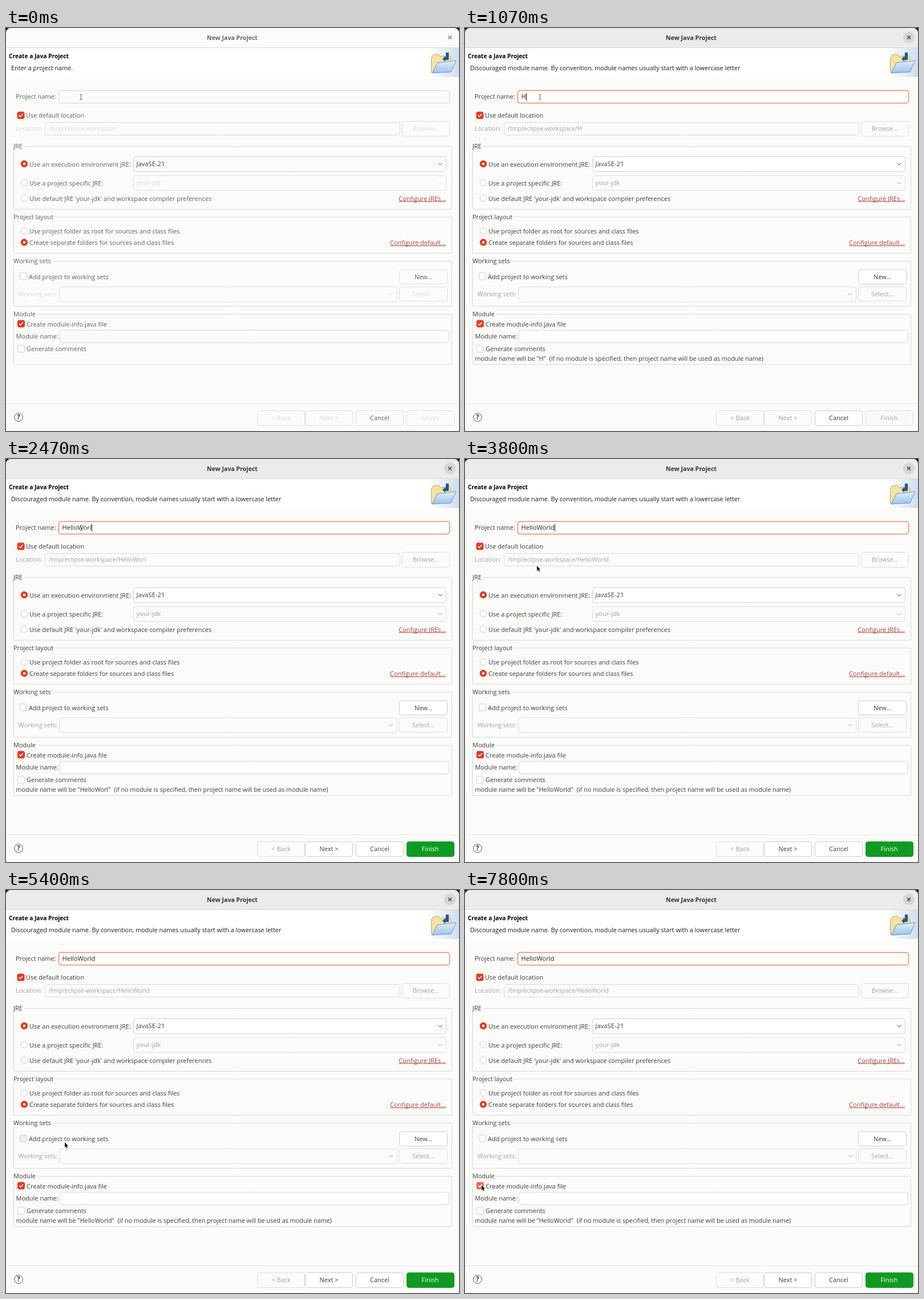
Recreate the animation shown at these times as an HTML page with a canvas. Size 794 px wide and 706 px high, loop 8 s.

```html
<!DOCTYPE html>
<html lang="en">
<head>
<meta charset="utf-8">
<title>New Java Project</title>
<style>
html, body { margin: 0; width: 100%; height: 100%; overflow: hidden; background: #fbfbfa; }
canvas { display: block; }
</style>
</head>
<body>
<canvas id="stage" width="794" height="706"></canvas>
<script>
const ctx = document.getElementById('stage').getContext('2d');
const LOOP = 8000, STEP = 200 / 3;
const FONT = '"Open Sans", "Noto Sans", sans-serif';
const LABEL = 11, FIELD = 11.2, SENTENCE = 10.8, TITLE = 10.6;
const RED = '#e03c24', PAGE = '#fbfbfa', WHITE = '#ffffff', GREEN = '#0f9a22';
const PROJECT = 'HelloWorld';
const KEY_TIMES = [1060, 1260, 1395, 1595, 1725, 1925, 2125, 2260, 2395, 2525];
// time, x, y of the pointer tip
const PATH = [
  [3390, 131, 121], [3600, 128, 152], [3800, 126, 187], [4000, 180, 375],
  [4200, 160, 550], [4600, 125, 520], [5070, 108, 455], [5400, 103, 442],
  [5930, 95, 494], [6130, 92, 509], [6330, 91, 511], [7130, 66, 524], [7530, 29, 517]
];

const clamp = v => Math.max(0, Math.min(1, v));
const easeOut = k => 1 - (1 - k) ** 3;
const fade = (t, from, length = 200) => easeOut(clamp((t - from) / length));

function mix(a, b, k) {
  const part = (c, i) => parseInt(c.slice(i, i + 2), 16);
  const rgb = [1, 3, 5].map(i => Math.round(part(a, i) + (part(b, i) - part(a, i)) * k));
  return `rgb(${rgb})`;
}

function pointerAt(t) {
  let i = 1;
  while (i < PATH.length - 1 && t > PATH[i][0]) i++;
  const [t0, x0, y0] = PATH[i - 1], [t1, x1, y1] = PATH[i];
  const k = clamp((t - t0) / (t1 - t0));
  return { x: x0 + (x1 - x0) * k, y: y0 + (y1 - y0) * k };
}

function text(str, x, cy, color, { size = LABEL, weight = 400, align = 'left' } = {}) {
  ctx.font = `${weight} ${size}px ${FONT}`;
  ctx.textAlign = align;
  ctx.fillStyle = color;
  ctx.fillText(str, x, cy + 4);
  return ctx.measureText(str).width;
}

function box(x, y, w, h, r, fill, stroke, line = 1) {
  ctx.beginPath();
  ctx.roundRect(x + 0.5, y + 0.5, w, h, r);
  ctx.fillStyle = fill;
  ctx.fill();
  if (!stroke) return;
  ctx.lineWidth = line;
  ctx.strokeStyle = stroke;
  ctx.stroke();
}

function poly(points, color, width) {
  ctx.beginPath();
  points.forEach(([x, y]) => ctx.lineTo(x, y));
  if (width) {
    ctx.lineWidth = width;
    ctx.strokeStyle = color;
    ctx.stroke();
  } else {
    ctx.fillStyle = color;
    ctx.fill();
  }
}

function disc(x, y, r, fill, stroke) {
  ctx.beginPath();
  ctx.arc(x, y, r, 0, Math.PI * 2);
  ctx.fillStyle = fill;
  ctx.fill();
  if (!stroke) return;
  ctx.lineWidth = 1;
  ctx.strokeStyle = stroke;
  ctx.stroke();
}

function checkbox(cx, cy, on, hover) {
  const fill = on ? (hover ? '#ee6a58' : RED) : (hover ? '#eeeeee' : WHITE);
  box(cx - 6.5, cy - 6.5, 12, 12, 2.5, fill, on ? fill : '#cccccc');
  if (on) poly([[cx - 3.2, cy], [cx - 0.9, cy + 2.4], [cx + 3.4, cy - 2.4]], WHITE, 1.5);
}

function radio(cy, on) {
  disc(32, cy, 5.8, on ? RED : WHITE, on ? RED : '#cccccc');
  if (on) disc(32, cy, 2.2, WHITE);
}

function group(label, top, bottom, ui) {
  box(13, top, 768, bottom - top, 1, PAGE, '#d8d8d8');
  ctx.font = `${LABEL}px ${FONT}`;
  ctx.fillStyle = PAGE;
  ctx.fillRect(12, top - 5, ctx.measureText(label).width + 3, 11);
  text(label, 13, top, ui.ink);
}

function button(label, x, y, w, h, on, ui) {
  const lit = on * ui.active;
  box(x, y, w, h, 4, mix(PAGE, WHITE, lit), mix('#dedede', '#cbcbcb', lit));
  text(label, x + w / 2 + 0.5, y + h / 2, on > 0.5 ? ui.ink : ui.dim, { align: 'center' });
}

function combo(value, x, y, w, on, ui) {
  const color = on ? ui.ink : ui.dim;
  box(x, y, w, 26, 4, on ? ui.paper : PAGE, on ? '#d0d0d0' : '#dedede');
  text(value, x + 5.5, y + 13, on ? '#3d3d3d' : color, { size: FIELD });
  const cx = x + w - 10, cy = y + 13;
  poly([[cx - 3.5, cy - 1.5], [cx, cy + 2], [cx + 3.5, cy - 1.5]], color, 1);
}

function link(label, cy) {
  const w = text(label, 771, cy, '#a84340', { align: 'right' });
  ctx.fillRect(771 - w, cy + 5, w, 1);
}

function folderIcon() {
  const glow = ctx.createLinearGradient(740, 0, 794, 0);
  glow.addColorStop(0, '#ffffff');
  glow.addColorStop(1, '#cfdeee');
  ctx.fillStyle = glow;
  ctx.fillRect(740, 35, 54, 51);
  const back = [[745.5, 78], [745.5, 52], [749, 47], [758, 46], [761, 50], [777, 48], [780, 52], [780, 74]];
  poly(back, '#f6e2a4');
  poly([...back, back[0]], '#c4a96c', 1);
  const front = [[747, 79], [756, 61], [789, 57], [780, 77]];
  const sheen = ctx.createLinearGradient(0, 57, 0, 79);
  sheen.addColorStop(0, '#e3f0fc');
  sheen.addColorStop(1, '#9cc3ec');
  poly(front, sheen);
  poly([...front, front[0]], '#6a92c4', 1);
  poly([[771, 43], [776, 43], [776, 56], [770, 56], [770, 59], [765, 54], [770, 49], [771, 52]], '#25568f');
}

function header(message, active) {
  ctx.fillStyle = mix(PAGE, '#ebebeb', active);
  ctx.fillRect(0, 0, 794, 34);
  ctx.fillStyle = '#dadada';
  ctx.fillRect(0, 34, 794, 1);
  text('New Java Project', 396.5, 16.5, mix('#666666', '#333333', active), { size: TITLE, weight: 700, align: 'center' });
  disc(778, 16.5, 10.3, mix(PAGE, '#d7d7d7', active));
  const cross = mix('#777777', '#3d3d3d', active);
  poly([[775, 13.5], [781, 19.5]], cross, 1.2);
  poly([[781, 13.5], [775, 19.5]], cross, 1.2);
  ctx.fillStyle = WHITE;
  ctx.fillRect(0, 35, 794, 54);
  text('Create a Java Project', 5, 49, '#000000', { size: 10.2, weight: 700 });
  text(message, 9, 69.5, '#1a1a1a', { size: SENTENCE });
  folderIcon();
}

function nameField(typed, caret, focus, ui) {
  text('Project name:', 17, 120, ui.ink);
  box(92, 109, 685, 22, 4, ui.paper, mix('#d6d6d6', '#e88a69', focus), 1 + focus * 0.5);
  const w = text(typed, 98.5, 120, '#222222', { size: FIELD });
  if (caret) {
    ctx.fillStyle = '#111111';
    ctx.fillRect(Math.round(98.5 + w), 114, 1, 13);
  }
}

function footer(ready, ui) {
  ctx.fillStyle = '#e6e6e6';
  ctx.fillRect(0, 658, 794, 1);
  disc(22, 682, 7.3, WHITE, '#555555');
  text('?', 22, 682, '#333333', { size: 11.5, weight: 700, align: 'center' });
  button('< Back', 440, 670, 83, 26, 0, ui);
  button('Next >', 524, 670, 83, 26, ready, ui);
  button('Cancel', 613, 670, 83, 26, 1, ui);
  box(702, 670, 83, 26, 4, mix(PAGE, GREEN, ready), mix('#dedede', GREEN, ready));
  text('Finish', 743.5, 683, ready > 0.3 ? WHITE : ui.dim, { align: 'center' });
}

function beam(x, y) {
  poly([[x, y - 4.5], [x, y + 4.5]], '#666666', 1);
  for (const dy of [-4.5, 4.5]) poly([[x - 2, y + dy], [x + 2, y + dy]], '#777777', 1);
}

function arrow({ x, y }) {
  const shape = [[0, 0], [0, 9], [2, 7.2], [3.5, 10.4], [5, 9.7], [3.6, 6.6], [6.2, 6.4], [0, 0]]
    .map(([dx, dy]) => [x + dx, y + dy]);
  poly(shape, WHITE, 1.4);
  poly(shape, '#111111');
}

function draw(time) {
  const t = Math.floor(time / STEP + 0.01) * STEP;
  const active = fade(t, 0, 270);
  const focus = fade(t, 130, 270);
  const ready = fade(t, 1066);
  const typed = PROJECT.slice(0, KEY_TIMES.filter(k => t >= k).length);
  const caret = t >= 260 && !(t >= 2990 && (t - 2990) % 1200 < 400);
  const moving = t >= 3395;
  const tip = pointerAt(t);
  const over = (cy, left, right) => moving && Math.abs(tip.y - cy) < 10 && tip.x > left && tip.x < right;
  const ui = {
    active,
    ink: mix('#606060', '#3d3d3d', active),
    dim: mix('#dadada', '#a2a2a2', active),
    paper: mix(PAGE, WHITE, active)
  };

  ctx.fillStyle = PAGE;
  ctx.fillRect(0, 0, 794, 706);
  header(typed
    ? 'Discouraged module name. By convention, module names usually start with a lowercase letter'
    : 'Enter a project name.', active);

  nameField(typed, caret, focus, ui);
  checkbox(26, 153, true, over(153, 18, 139));
  text('Use default location', 35, 153, ui.ink);
  text('Location:', 17, 176, ui.dim);
  box(68, 165, 622, 22, 4, PAGE, '#d9d9d9');
  text('/tmp/eclipse-workspace' + (typed && '/' + typed), 75, 176, ui.dim, { size: TITLE });
  button('Browse...', 694, 163, 83, 26, 0, ui);

  group('JRE', 207, 317, ui);
  radio(238, true);
  text('Use an execution environment JRE:', 41, 238.5, ui.ink);
  combo('JavaSE-21', 223, 225, 548, true, ui);
  radio(271, false);
  text('Use a project specific JRE:', 41, 271.5, ui.ink);
  combo('your-jdk', 223, 258, 548, false, ui);
  radio(298, false);
  text("Use default JRE 'your-jdk' and workspace compiler preferences", 41, 298.5, ui.ink);
  link('Configure JREs...', 298.5);

  group('Project layout', 330.5, 394, ui);
  radio(355.5, false);
  text('Use project folder as root for sources and class files', 41, 356, ui.ink);
  radio(375.5, true);
  text('Create separate folders for sources and class files', 41, 376, ui.ink);
  link('Configure default...', 376);

  group('Working sets', 408, 487, ui);
  checkbox(30.5, 435, false, over(435, 23, 182));
  text('Add project to working sets', 40, 435.5, ui.ink);
  button('New...', 689, 423, 84, 25, 1, ui);
  text('Working sets:', 21.5, 465.5, ui.dim);
  combo('', 93, 453, 592, false, ui);
  button('Select...', 689, 453, 84, 25, 0, ui);

  group('Module', 501, 589, ui);
  checkbox(26.5, 518, true, over(518, 18, 178));
  text('Create module-info.java file', 36, 518.5, ui.ink);
  text('Module name:', 17.5, 540, ui.ink);
  box(94, 529, 682, 22, 4, ui.paper, '#d6d6d6');
  checkbox(26.5, 562, false, over(562, 18, 140));
  text('Generate comments', 36, 562, ui.ink);
  if (typed) {
    text(`module name will be "${typed}"  (if no module is specified, then project name will be used as module name)`,
      17.5, 579, ui.ink, { size: SENTENCE });
  }
  footer(ready, ui);

  // black outside the rounded window corners
  ctx.beginPath();
  ctx.rect(0, 0, 794, 20);
  ctx.roundRect(0, 0, 794, 20, [8, 8, 0, 0]);
  ctx.fillStyle = '#000000';
  ctx.fill('evenodd');

  if (moving) arrow(tip);
  else beam(131.5, 121);
}

const start = performance.now();
function tick() {
  draw((performance.now() - start) % LOOP);
  requestAnimationFrame(tick);
}
tick();
</script>
</body>
</html>
```
